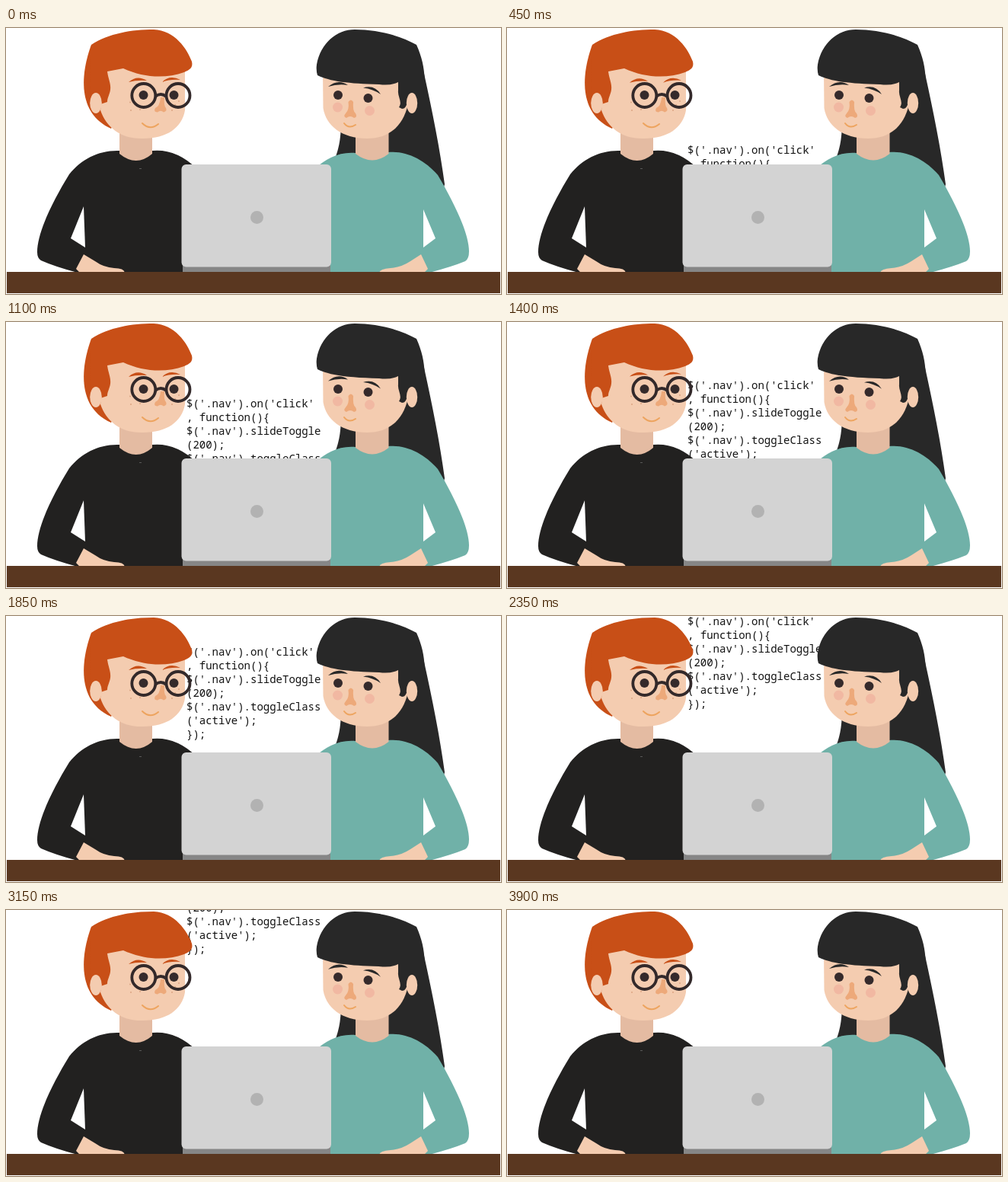
An HTML page for the animation above (3.93 s loop, 650 by 349 pixels).

```html
<!DOCTYPE html>
<html lang="en">
<head>
<meta charset="utf-8">
<title>Pair programming</title>
<style>
  html, body { margin: 0; width: 100%; height: 100%; overflow: hidden; background: #fff; }
  svg { display: block; width: 650px; height: 349px; }
  text { font: 14px "Noto Sans Mono", "DejaVu Sans Mono", monospace; fill: #111; }
  .skin { fill: #f4ccb0; }
  .neck { fill: #e4bba2; }
  .ginger { fill: #c84f17; }
  .black { fill: #282828; }
  .eye { fill: #352a2b; }
  .nose { fill: #eda97a; }
  .cheek { fill: #f1b8a2; }
  .freckle { fill: #dca583; }
  .line { fill: none; stroke: #eda45f; stroke-width: 2; stroke-linecap: round; }
  .glasses { fill: none; stroke: #33292a; stroke-width: 3.8; }
</style>
</head>
<body>
<svg viewBox="0 0 650 349">
  <g id="code"></g>

  <g id="man">
    <path fill="#222120" d="M149 161C122 160 99 172 83 192C62 226 41 268 41 294Q41 302 46 305Q64 313 94 321H250V184Q223 158 192 161Z"/>
    <path fill="#fff" d="M102 234L85 276L104 288Z"/>
    <path class="skin" d="M102 297L117 306Q128 314 142 315Q155 315 156 321H97L92 316Z"/>
    <path fill="#666" d="M175 184h3v.8h-3z"/>
    <path class="neck" d="M149 138H192V165Q171 183 149 165Z"/>
    <path class="ginger" d="M112 22C98 60 93 112 138 132L160 90V40Z"/>
    <path class="skin" d="M130 50H235V108C231 131 211 145 180 145C152 146 132 131 124 108Z"/>
    <path class="ginger" d="M112 22C135 7 165 2 194 2C222 3 238 28 244 44C246 52 241 55 234 58C209 67 180 65 154 53L133 57C134 66 138 73 137 81C136 88 133 91 133 97L124 100L110 90Z"/>
    <ellipse class="skin" cx="118" cy="98.5" rx="7.8" ry="13.5"/>
    <g id="manBrows" class="ginger">
      <path d="M161 71Q172 61 185 69Q172 68 161 71Z"/>
      <path d="M205 71Q215 61 229 68Q215 67 205 71Z"/>
    </g>
    <path class="nose" d="M203 91Q202 103 196 105Q193 110 199 110.500Q203 107 207 110.500Q212 109 210 105Q207 102 208 91Z"/>
    <g class="freckle">
      <circle cx="163" cy="97.500" r="1"/><circle cx="164" cy="108" r="1"/>
      <circle cx="176" cy="107" r="1"/><circle cx="218" cy="108" r="1"/>
      <circle cx="222" cy="101" r="1"/><circle cx="227" cy="96" r="1"/>
    </g>
    <path class="line" d="M179 125Q189 135 200 126"/>
    <circle class="eye" cx="180.500" cy="88" r="6"/>
    <circle class="eye" cx="220.500" cy="88" r="6"/>
    <g class="glasses">
      <circle cx="180.800" cy="88.500" r="15.500"/>
      <circle cx="226" cy="88.500" r="15.500"/>
      <path d="M196 90Q203 84 210.500 90"/>
    </g>
  </g>

  <g id="woman">
    <path class="black" d="M440 120C440 150 436 160 431 175L575 209L576 205C570 160 560 110 549 60Z"/>
    <path fill="#70b1a8" d="M459 164C437 162 420 172 406 184V321H556Q586 313 603 306Q608 303 608 293C608 270 589 230 567 193C550 173 526 161 502 163Z"/>
    <path fill="#fff" d="M548 238L564 276L548 288Z"/>
    <path class="skin" d="M545 297L531 306Q519 314 505 315Q491 316 490 321H549L554 316Z"/>
    <path class="neck" d="M459 138H502.500V165Q481 182 459 165Z"/>
    <path class="skin" d="M416 55H528V100C521 130 502 145 474 145C441 145 420 128 416.500 105Z"/>
    <path class="black" d="M408 48C413 20 434 2 458 2C488 2 518 10 539 22C546 38 549 50 550 70L548 92L530 86C527 92 528 106 520 106L516 104C521 97 514 90 515 82V71Q505 76 490 74C450 73 425 70 409 62Q407 56 408 48Z"/>
    <ellipse class="skin" cx="533" cy="98.500" rx="7.200" ry="13.500"/>
    <g id="womanBrows" class="black">
      <path d="M423 77Q436 66 449 75Q436 73 423 77Z"/>
      <path d="M469 78.500Q484 74 492 87Q482 80 469 78.500Z"/>
    </g>
    <circle class="cheek" cx="435.500" cy="104" r="6.500"/>
    <circle class="cheek" cx="477.500" cy="108.500" r="6.500"/>
    <path class="nose" d="M449.500 97Q453 92 456 97Q455 109 459 112Q462 117 457 118Q452 114 447 118Q442 116 446 112Q451 107 449.500 97Z"/>
    <path class="line" d="M444 125Q450 133 459 127"/>
    <circle class="eye" cx="436" cy="88" r="6"/>
    <circle class="eye" cx="475.500" cy="92" r="6"/>
  </g>

  <rect x="232" y="305" width="194" height="16" fill="#868686"/>
  <rect x="230.500" y="179" width="196.500" height="134.500" rx="6" fill="#d3d3d3"/>
  <circle cx="329.500" cy="248.500" r="8.500" fill="#b2b2b2"/>
  <rect x="1" y="320" width="648" height="28" fill="#5a3720"/>
</svg>
<script>
  const LOOP = 3930, STEP = 50, LINE_HEIGHT = 18;
  const lines = [
    "$('.nav').on('click'", ", function(){", "$('.nav').slideToggle",
    "(200);", "$('.nav').toggleClass", "('active');", "});"
  ];
  const byId = id => document.getElementById(id);
  const code = byId("code"), manBrows = byId("manBrows"), womanBrows = byId("womanBrows");

  lines.forEach((line, i) => {
    const text = document.createElementNS("http://www.w3.org/2000/svg", "text");
    text.setAttribute("x", 237);
    text.setAttribute("y", i * LINE_HEIGHT);
    text.textContent = line;
    code.append(text);
  });

  const shiftY = (node, y) => node.setAttribute("transform", `translate(0 ${y.toFixed(2)})`);

  // Rises from 0 to 1 and back between two times.
  const swell = (t, from, to) =>
    t <= from || t >= to ? 0 : Math.sin(Math.PI * (t - from) / (to - from));

  function draw(now) {
    const t = Math.floor(now % LOOP / STEP) * STEP;
    shiftY(code, 200.8 - 0.0804 * t);
    shiftY(manBrows, swell(t, 50, 1700));
    shiftY(womanBrows, swell(t, 650, 3900));
    requestAnimationFrame(draw);
  }
  draw(performance.now());
</script>
</body>
</html>
```
